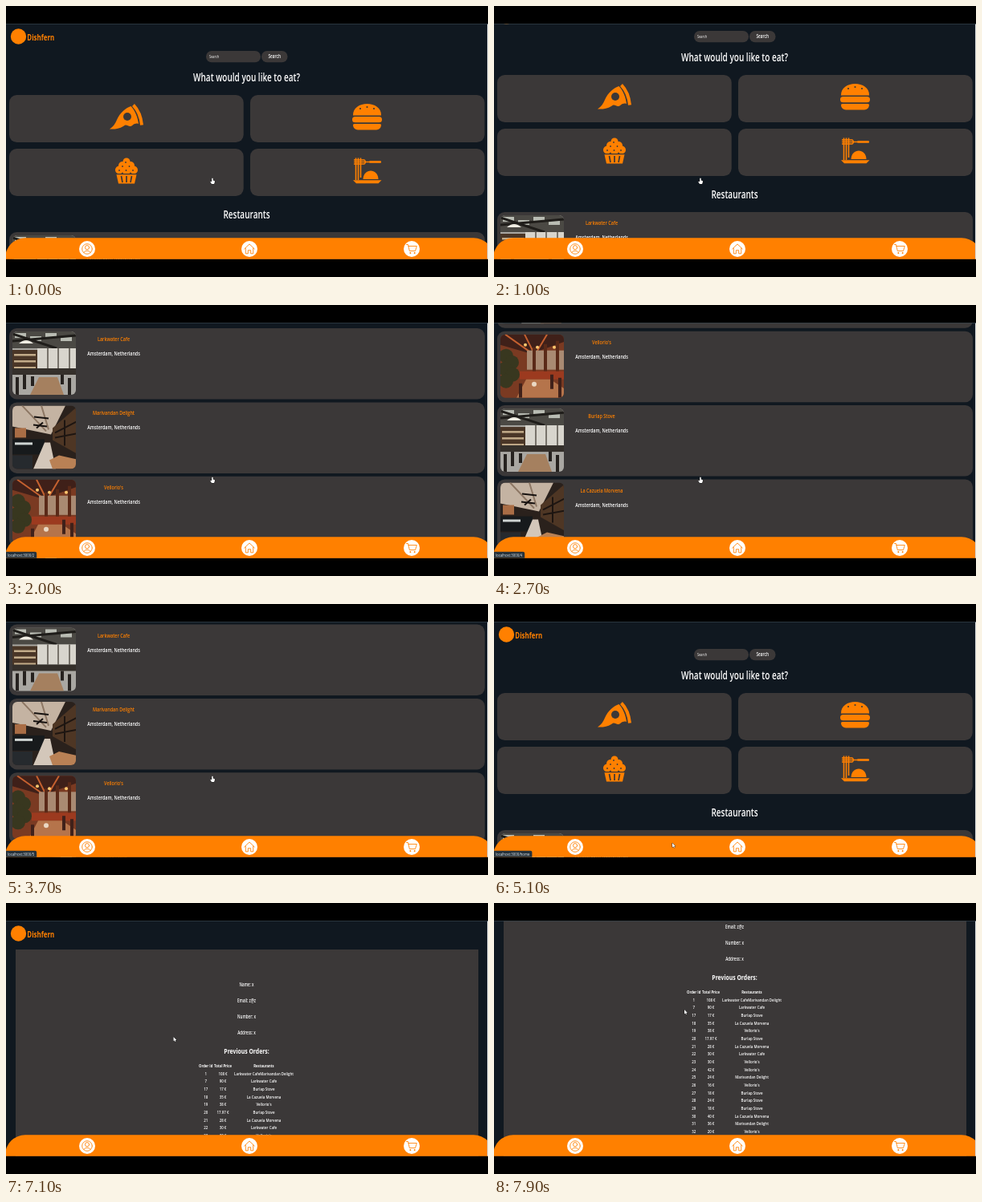
Animation, 600 px wide and 338 px high, one loop 8 s. Source, as an HTML page with a canvas:

```html
<!DOCTYPE html>
<html lang="en">
<head>
<meta charset="utf-8">
<title>Food ordering app</title>
<style>
  html, body { margin: 0; width: 100%; height: 100%; overflow: hidden; background: #000; }
  canvas { display: block; width: 100vw; height: 100vh; }
</style>
</head>
<body>
<canvas id="stage"></canvas>
<script>
const W = 600, H = 338, LOOP = 8000, STEP = 100;
const ORANGE = '#ff8000', CARD = '#3b3838', NIGHT = '#101820', WHITE = '#fff';
const TOP = 22, BOTTOM = 315.7, NARROW = 0.72;
const canvas = document.getElementById('stage');
const ctx = canvas.getContext('2d');

const places = ['Larkwater Cafe', 'Marivandan Delight', "Vellorio's", 'Burlap Stove', 'La Cazuela Morvena'];
const LIST_TOP = 282, PITCH = 92.4;

// id, total, place index
const orders = [
  [7, 90, 0], [17, 17, 3], [18, 35, 4], [19, 38, 2], [20, 17.97, 3], [21, 28, 4],
  [22, 30, 0], [23, 30, 2], [24, 42, 2], [25, 24, 1], [26, 16, 2], [27, 18, 3],
  [28, 24, 3], [29, 18, 3], [30, 40, 4], [31, 36, 1], [32, 20, 2]
];

// time, value...
const homeScroll = [[900, 0], [1000, 25], [2000, 253], [2800, 460], [3450, 460], [3700, 256.5], [4000, 0]];
const profileScroll = [[7200, 0], [7500, 45], [7800, 92]];
const pointer = [[4500, 257, 215], [4900, 298, 298], [5100, 222, 298], [5400, 102, 301],
  [5900, 100, 301], [6200, 94.5, 303], [6700, 94.5, 303], [7200, 237, 133]];

function track(keys, t) {
  if (t <= keys[0][0]) return keys[0].slice(1);
  for (let i = 1; i < keys.length; i++) {
    const a = keys[i - 1], b = keys[i];
    if (t <= b[0]) {
      const k = (t - a[0]) / (b[0] - a[0]);
      return a.slice(1).map((v, j) => v + (b[j + 1] - v) * k);
    }
  }
  return keys[keys.length - 1].slice(1);
}

function rect(x, y, w, h, color) {
  ctx.fillStyle = color;
  ctx.fillRect(x, y, w, h);
}

function round(x, y, w, h, r, color) {
  ctx.fillStyle = color;
  ctx.beginPath();
  ctx.roundRect(x, y, w, h, r);
  ctx.fill();
}

function disc(x, y, r, color) {
  ctx.fillStyle = color;
  ctx.beginPath();
  ctx.arc(x, y, r, 0, 7);
  ctx.fill();
}

function shape(d, color) {
  ctx.fillStyle = color;
  ctx.fill(new Path2D(d));
}

function line(d, color, width) {
  ctx.strokeStyle = color;
  ctx.lineWidth = width;
  ctx.stroke(new Path2D(d));
}

// One condensed face for the whole interface; returns the set width
function text(s, x, y, size, color = WHITE, weight = 600, align = 'center') {
  ctx.save();
  ctx.translate(x, y);
  ctx.scale(NARROW, 1);
  ctx.font = `${weight} ${size}px "Open Sans", "Noto Sans", sans-serif`;
  ctx.textAlign = align;
  ctx.textBaseline = 'alphabetic';
  ctx.fillStyle = color;
  ctx.fillText(s, 0, size * 0.34);
  const width = ctx.measureText(s).width * NARROW;
  ctx.restore();
  return width;
}

function logo() {
  disc(15.5, 38, 9.7, ORANGE);
  text('Dishfern', 26.3, 39.5, 11, ORANGE, 700, 'left');
}

function pizza() {
  shape('M129 153.5C133 151 136 147 138 142C142 133 149 127 155.5 125C161 131 164 139 165 147C159 145 157 151 154 150C150 149 150 147 146 150C141 153 135 154 129 153.5Z', ORANGE);
  disc(151, 138, 5, CARD);
  line('M158.5 123.5Q167.5 133 169 148.5', ORANGE, 4);
}

function burger() {
  shape('M432 136.5C431 117 468 117 467 136.5Z', ORANGE);
  [[441, 128], [449.5, 126], [458, 128]].forEach(([x, y]) => disc(x, y, 1.1, CARD));
  round(431, 138, 37, 7.3, 3.6, ORANGE);
  round(432, 147, 35, 7.5, [1.5, 1.5, 6, 6], ORANGE);
}

function cupcake() {
  [[150, 194, 4.5], [145, 199, 5], [155, 199, 5], [141, 204.5, 5], [150, 204, 6], [159, 204.5, 5]]
    .forEach(([x, y, r]) => disc(x, y, r, ORANGE));
  [[149, 195], [145, 200], [153.5, 200], [141, 205], [149.5, 205], [158, 205]]
    .forEach(([x, y]) => disc(x, y, 0.9, CARD));
  rect(136.5, 209, 27, 1.2, CARD);
  shape('M137.5 210.2H162.5L160 221.5H140Z', ORANGE);
  line('M143.5 212L145 220M150 212V220M156.5 212L155 220', CARD, 1.7);
}

function noodles() {
  line('M435.5 189.5V217M438.5 189.5V217M441.5 189.5V214', ORANGE, 1.6);
  line('M433 194.5H467M433 192H446Q449 194.5 446 197H433', ORANGE, 1.5);
  round(452, 193.2, 15, 2.6, 1.3, ORANGE);
  shape('M444.5 216C445 202 463 202 463.5 216Z', ORANGE);
  shape('M432 217.2H467.5L463.5 221.2H436Z', ORANGE);
}

const interiors = [
  () => {
    rect(0, 0, 80, 80, '#a9a7a2');
    rect(0, 0, 80, 21, '#4b4944');
    [3, 22, 41, 60].forEach((x, i) => rect(x, 2 + i % 2 * 4, 14, 6, '#b9bcb3'));
    line('M0 12L80 5M0 3L55 21', '#1f1d1a', 3);
    shape('M8 15Q17 7 26 15Z', '#efece2');
    rect(31, 21, 49, 25, '#d8d5cd');
    line('M44 21V46M57 21V46M71 21V46', '#57524a', 1.5);
    rect(0, 23, 31, 25, '#4a3627');
    [28, 36, 44].forEach(y => rect(2, y, 27, 2.5, '#c2ab89'));
    rect(0, 46, 80, 8, '#35302b');
    shape('M22 79L33 57H56L64 79Z', '#a5805f');
    line('M6 57V79M15 54V72M25 56V68M62 54V66M71 58V79', '#26221f', 4);
  },
  () => {
    rect(0, 0, 80, 80, '#2a211c');
    shape('M0 0H66L48 36L0 26Z', '#c4b3a2');
    line('M12 0L42 32M36 0L45 30', '#8d7764', 2);
    shape('M80 2V60L50 43V28Z', '#4e3624');
    line('M53 34L80 20M53 40L80 35M65 18V50', '#1d1511', 2);
    line('M26 24L43 26M30 28L38 21M27 14L45 16', '#16110f', 2);
    rect(3, 28, 14, 12, '#a96d45');
    rect(0, 42, 40, 19, '#171a1c');
    rect(3, 46, 22, 3, '#ced4d2');
    shape('M26 79L40 46H47L54 79Z', '#d3c7ba');
    shape('M46 68L58 62L80 67V79H50Z', '#b98155');
    rect(0, 62, 25, 17, '#262a2e');
  },
  () => {
    rect(0, 0, 80, 80, '#7a3a22');
    shape('M0 0H80V9L38 24L0 13Z', '#3f2019');
    line('M6 0L37 22M30 0L41 22M58 0L45 22', '#c4602f', 2);
    rect(33, 20, 47, 24, '#a98a72');
    line('M42 16V48M56 12V48M71 8V48', '#5a2a18', 4);
    [[31, 13], [46, 16], [67, 16]].forEach(([x, y]) => disc(x, y, 2, '#ffc66e'));
    [[7, 27], [14, 35], [6, 43], [15, 50], [7, 58]].forEach(([x, y]) => disc(x, y, 9, '#38371f'));
    rect(24, 46, 56, 10, '#9c3a1f');
    shape('M20 79L32 56H62L80 68V79Z', '#b5744b');
    line('M25 61V79M64 50V68M74 54V79', '#40211a', 4);
    disc(42, 62, 3, '#ead8c3');
  }
];

function photo(i, x, y) {
  ctx.save();
  ctx.translate(x, y);
  ctx.beginPath();
  ctx.roundRect(0, 0, 79, 79, 6);
  ctx.clip();
  interiors[i % interiors.length]();
  ctx.restore();
}

function home(scroll) {
  ctx.save();
  ctx.translate(0, -scroll);
  logo();
  round(249, 56, 68, 14.3, 7, CARD);
  round(318, 56, 32.5, 14.3, 7, CARD);
  text('Search', 253, 63, 5.4, WHITE, 400, 'left');
  text('Search', 334.2, 63, 6.6);
  text('What would you like to eat?', 299.5, 89, 13.9);
  for (const y of [111, 178]) {
    round(4, y, 291.7, 59, 9.5, CARD);
    round(304, y, 291.7, 59, 9.5, CARD);
  }
  pizza();
  burger();
  cupcake();
  noodles();
  text('Restaurants', 299.5, 260, 13.9);
  places.forEach((name, i) => {
    const y = LIST_TOP + i * PITCH;
    round(4, y, 592, 88.5, 9.5, CARD);
    photo(i, 8, y + 4);
    text(name, 134, y + 13.5, 7.6, ORANGE);
    text('Amsterdam, Netherlands', 134, y + 31.5, 7.5);
  });
  ctx.restore();
}

function profile(scroll) {
  const end = 92;
  ctx.save();
  ctx.translate(0, -scroll);
  logo();
  rect(12, 58, 576, 500, CARD);
  ctx.translate(0, end);
  ['Name: x', 'Email: z@z', 'Number: x', 'Address: x']
    .forEach((s, i) => text(s, 299.5, 9.5 + i * 20.1, 6.3));
  text('Previous Orders:', 299.5, 92.3, 9.5, WHITE, 700);
  const row = (cells, y, size, weight) =>
    [248.7, 270, 321].forEach((x, i) => text(cells[i], x, y, size, WHITE, weight));
  row(['Order Id', 'Total Price', 'Restaurants'], 111, 5.8, 700);
  row(['1', '108 €', places[0] + places[1]], 120.8, 6.1, 600);
  orders.forEach(([id, total, place], i) =>
    row([id, total + ' €', places[place]], 130.4 + i * 9.65, 6.1, 600));
  ctx.restore();
}

function nav() {
  round(-1, 289.3, 608, 50, 25, ORANGE);
  [101, 303, 505].forEach(x => disc(x, 303, 10, WHITE));
  ctx.lineCap = ctx.lineJoin = 'round';
  line('M107.3 303A6.3 6.3 0 1 1 94.7 303A6.3 6.3 0 1 1 107.3 303M103.6 301.2A2.6 2.6 0 1 1 98.4 301.2A2.6 2.6 0 1 1 103.6 301.2M96.8 307.3Q101 302.8 105.2 307.3', ORANGE, 0.85);
  line('M296.7 303L303 296.9L309.3 303M298.3 302V308.8H301.3V304.7H304.7V308.8H307.7V302', ORANGE, 0.85);
  line('M498.5 297.5H500.5L502.3 305.5H509.5L511.3 299.5H501', ORANGE, 0.85);
  disc(503.4, 308.1, 1, ORANGE);
  disc(508.6, 308.1, 1, ORANGE);
  ctx.lineCap = 'butt';
  ctx.lineJoin = 'miter';
}

function bubble(path, x) {
  const label = 'localhost:3000/' + path, size = 6;
  ctx.font = `400 ${size}px "Open Sans", "Noto Sans", sans-serif`;
  const w = ctx.measureText(label).width * NARROW;
  round(x, 307.7, w + 5, 9, [0, 2, 0, 0], '#26323b');
  text(label, x + 2, 312.2, size, '#e6eaec', 400, 'left');
}

function status(t) {
  if (t >= 5400 && t < 6500) return bubble('profile', 404.5);
  if (t >= 4900 && t < 5400) return bubble('home', 0);
  if (t >= 4100) return;
  // The label trails the scroll and stays put on the way back up
  const s = track(homeScroll, Math.min(t - 100, 3400))[0];
  const i = Math.floor((s + 218 - LIST_TOP) / PITCH);
  if (i >= 0) bubble(Math.min(i + 1, 5), 0);
}

function cursor(t) {
  const [x, y] = track(pointer, t);
  const hand = t <= 4600 || (t >= 5400 && t < 5800);
  ctx.save();
  ctx.translate(x, y);
  const d = hand
    ? 'M-.8 0Q0 -.9 .7 0V2.4L2.6 3Q3.2 3.4 2.8 5.1L2 7H-1L-2.7 4.4Q-2.2 3.3 -.8 4.3Z'
    : 'M0 0V5.4L1.2 4.3L2 6L3 5.5L2.2 3.9H3.8Z';
  line(d, '#111', 0.8);
  shape(d, WHITE);
  ctx.restore();
}

function draw(t) {
  const unit = canvas.width / W;
  ctx.setTransform(unit, 0, 0, canvas.height / H, 0, 0);
  rect(0, 0, W, H, '#000');
  ctx.save();
  ctx.beginPath();
  ctx.rect(0, TOP, W, BOTTOM - TOP);
  ctx.clip();
  rect(0, TOP, W, BOTTOM - TOP, NIGHT);
  if (t >= 5800 && t < 6500) {
    text('Loading...', 303, 26.7, 6.2);
  } else {
    if (t < 5800) home(track(homeScroll, t)[0]);
    else profile(track(profileScroll, t)[0]);
    nav();
    rect(599, TOP, 1, BOTTOM - TOP, '#d5d8da'); // scrollbar edge
  }
  rect(0, TOP, W, 0.7, '#35424b');
  status(t);
  cursor(t);
  ctx.restore();
}

function resize() {
  const dpr = window.devicePixelRatio || 1;
  canvas.width = Math.round(innerWidth * dpr);
  canvas.height = Math.round(innerHeight * dpr);
}

const start = performance.now();
function tick() {
  const t = (performance.now() - start) % LOOP;
  draw(Math.floor(t / STEP) * STEP);
  requestAnimationFrame(tick);
}

addEventListener('resize', resize);
resize();
tick();
</script>
</body>
</html>
```
